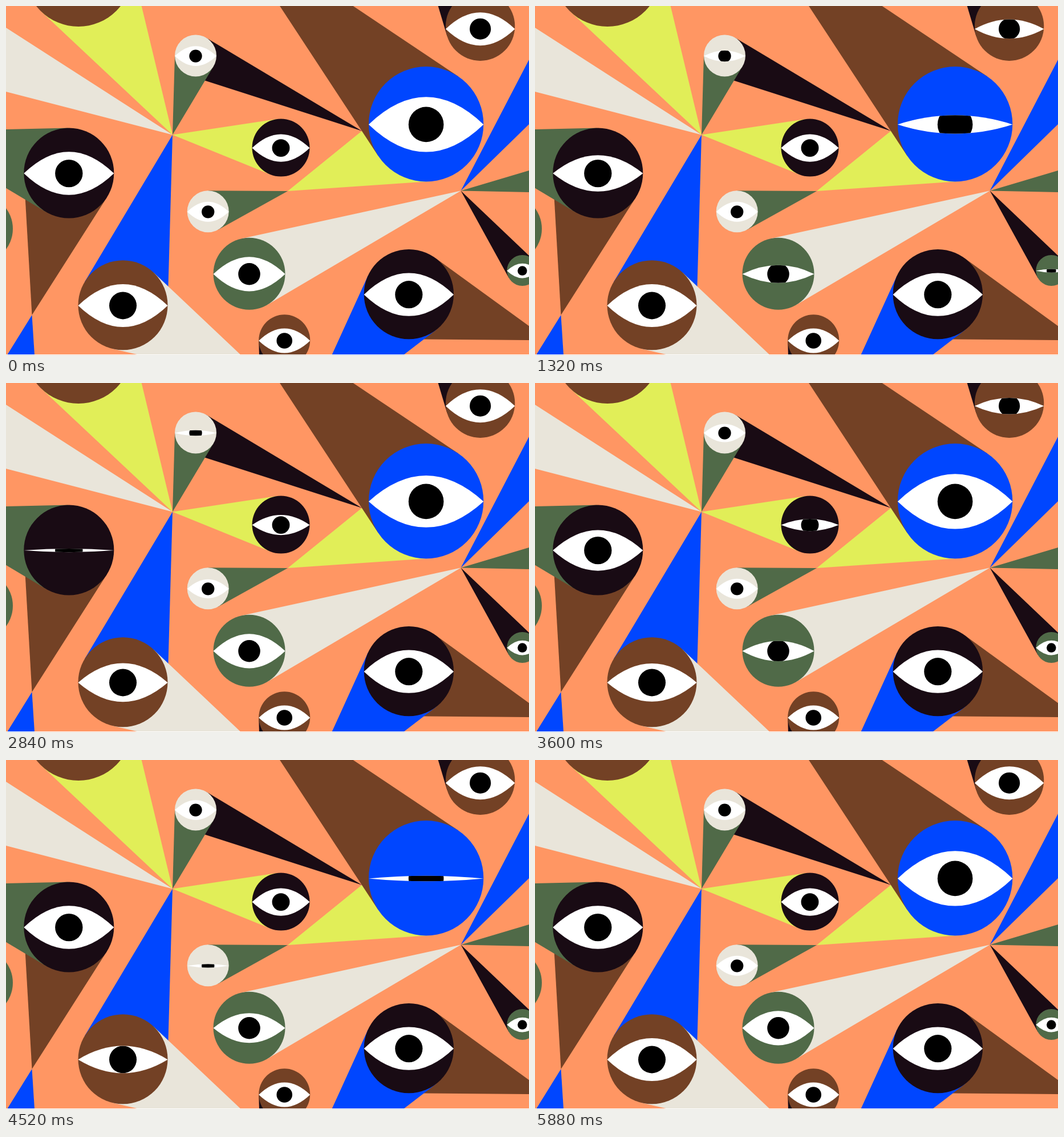
Recreate the animation shown at these times as an HTML page with a canvas. Size 917 px wide and 611 px high, loop 6000 ms.

```html
<!DOCTYPE html>
<html lang="en">
<head>
<meta charset="utf-8">
<title>Blinking eyes</title>
<style>
html, body { margin: 0; width: 100%; height: 100%; overflow: hidden; background: #ff9663; }
canvas { display: block; }
</style>
</head>
<body>
<canvas width="917" height="611"></canvas>
<script>
const g = document.querySelector('canvas').getContext('2d');
const LOOP = 6000, STEP = 40;
const CLOSE = 0.42;                              // share of a blink spent closing
const LENS = 0.478, PUPIL = 0.306, SHUT = 3;     // lens and pupil relative to the ball; shut half-height in px
const orange = '#ff9663', brown = '#734125', yellow = '#e1ee58', cream = '#e9e5da',
      green = '#506a48', dark = '#190b14', blue = '#0046ff';

const ball = (color, x, y, r) => ({ color, x, y, r });

// An eye blinks at start and once more after gap, each time for dur ms.
const eye = (color, x, y, r, start, dur, gap = 0, lift = 0.6) =>
  ({ ...ball(color, x, y, r), start, dur, gap, lift });

const topBall = ball(brown, 127, -58, 94);
const leftBall = ball(green, -48, 390, 60);
const topWhite = eye(cream, 332.5, 87, 36.5, 1020, 1330, 1330);
const left = eye(dark, 110.3, 292.5, 79, 60, 1400, 2190);
const lowerLeft = eye(brown, 205, 523.8, 78.5, 1640, 1280, 1895);
const middle = eye(dark, 482, 248, 50.5, 2640, 1530);
const grey = eye(cream, 354.2, 359.7, 36.5, 1700, 1180, 2330);
const lowerGreen = eye(green, 426.5, 468.7, 63, 441, 1280, 2912);
const bottom = eye(brown, 488.2, 585.3, 45, 1840, 800, 1800);
const big = eye(blue, 736.6, 206.8, 100.7, 640, 2280, 2960);
const lowerRight = eye(dark, 706.3, 504.6, 78.7, 60, 1040, 1320);
const topRight = eye(brown, 831.6, 35.2, 60.7, 1170, 760, 1920, 5);
const edge = eye(green, 905.3, 463, 27, 880, 1040);
const eyes = [topWhite, left, lowerLeft, middle, grey, lowerGreen, bottom, big, lowerRight, topRight, edge];

// Points where several beams meet.
const hub = [292, 225.5], tip = [624, 218.8], mid = [494, 324], right = [797.5, 323.5], low = [45.5, 541];

function poly(color, ...points) {
  g.fillStyle = color;
  g.beginPath();
  for (const p of points) g.lineTo(...p);
  g.fill();
}

function disc(color, x, y, r) {
  g.fillStyle = color;
  g.beginPath();
  g.arc(x, y, r, 0, 2 * Math.PI);
  g.fill();
}

// Wedge from a point along both tangents of a ball.
function beam(color, [x, y], b) {
  const dx = b.x - x, dy = b.y - y, d = Math.hypot(dx, dy);
  const mean = Math.atan2(dy, dx), spread = Math.asin(b.r / d), len = Math.sqrt(d * d - b.r ** 2);
  const touch = a => [x + len * Math.cos(a), y + len * Math.sin(a)];
  poly(color, [x, y], touch(mean - spread), [b.x, b.y], touch(mean + spread));
}

function drawBeams() {
  g.fillStyle = orange;
  g.fillRect(0, 0, 917, 611);
  poly(cream, hub, [0, 38], [0, 150]);
  poly(blue, low, [2, 611], [50, 611]);
  poly(blue, right, [917, 94], [917, 207]);
  poly(green, right, [917, 288], [917, 326]);
  poly(yellow, mid, tip, [big.x, big.y], [743, 307]);
  beam(brown, [379, -153.6], big);
  beam(yellow, hub, topBall);
  beam(yellow, hub, middle);
  beam(brown, low, left);
  beam(green, [-166, 220], left);
  beam(blue, hub, lowerLeft);
  beam(cream, [469, 665], lowerLeft);
  beam(dark, tip, topWhite);
  beam(green, hub, topWhite);
  beam(green, mid, grey);
  beam(cream, right, lowerGreen);
  beam(dark, right, edge);
  beam(dark, [697.5, -200], topRight);
  beam(dark, [447, 720], bottom);
  beam(brown, [951.6, 585.3], lowerRight);
  beam(blue, [504, 758.6], lowerRight);
}

function openness({ start, dur, gap }, t) {
  const begin = gap && t >= start + gap ? start + gap : start;
  const u = (t - begin) / dur;
  if (u < 0 || u > 1) return 1;
  return u < CLOSE ? 1 - u / CLOSE : (u - CLOSE) / (1 - CLOSE);
}

function drawEye(e, t) {
  const { x, r } = e, y = e.y + e.lift;
  const h = SHUT + (LENS * r - SHUT) * openness(e, t);
  disc(e.color, x, e.y, r);
  g.save();
  g.beginPath();
  g.moveTo(x - r, y);
  g.quadraticCurveTo(x, y - 2 * h, x + r, y);
  g.quadraticCurveTo(x, y + 2 * h, x - r, y);
  g.fillStyle = '#fff';
  g.fill();
  g.clip();
  disc('#000', x, y, PUPIL * r);
  g.restore();
}

function frame() {
  const t = Math.floor(performance.now() % LOOP / STEP) * STEP;
  drawBeams();
  for (const b of [topBall, leftBall]) disc(b.color, b.x, b.y, b.r);
  for (const e of eyes) drawEye(e, t);
  g.fillStyle = '#fff';
  g.fillRect(0, 610, 917, 1);
  requestAnimationFrame(frame);
}
frame();
</script>
</body>
</html>
```
